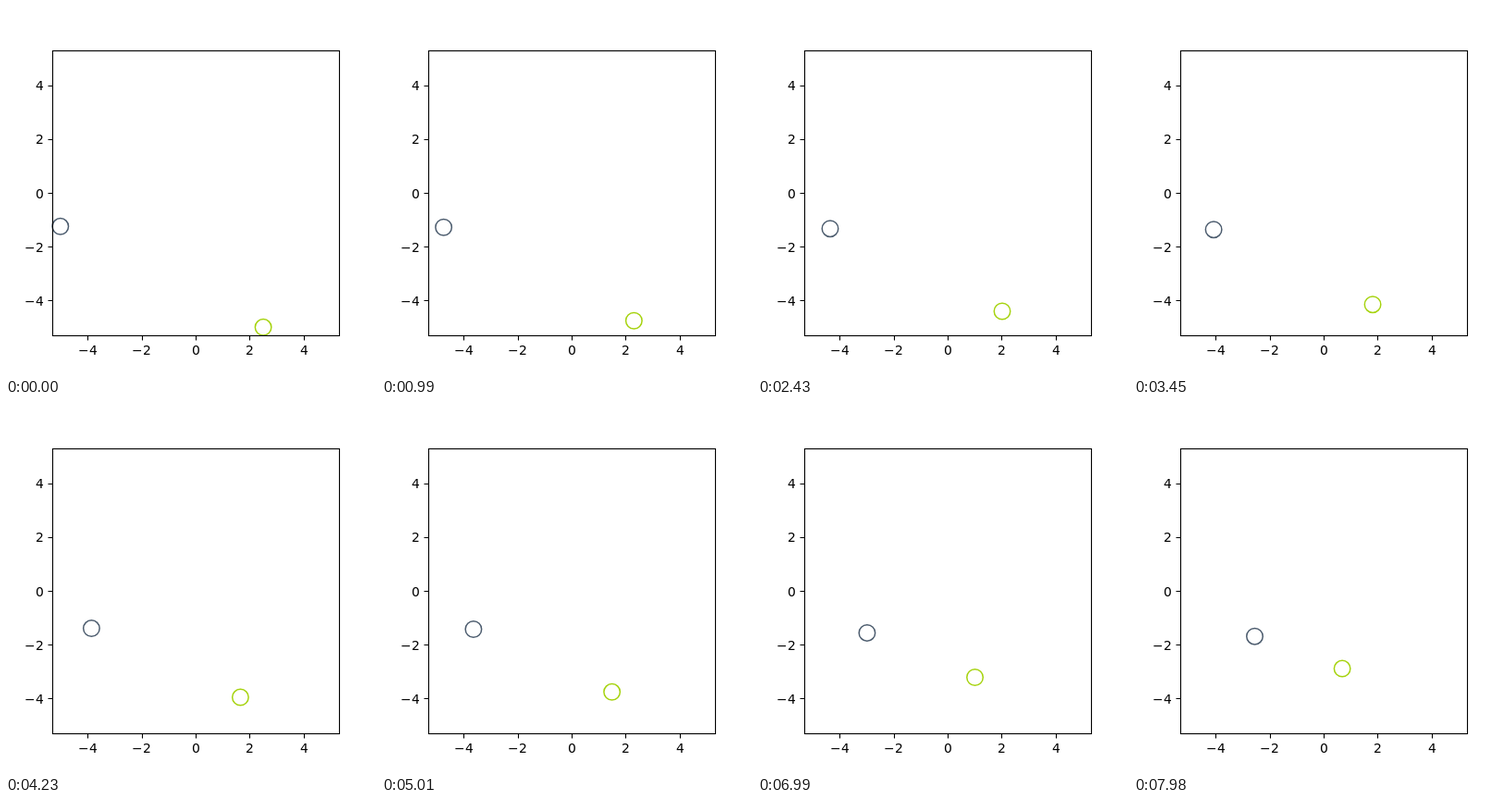
Animation, 400 px wide and 400 px high, one loop 8 s. Source, as an HTML page:

```html
<!DOCTYPE html>
<html lang="en">
<head>
<meta charset="utf-8">
<title>Two circles</title>
<style>
  html, body { margin: 0; width: 100%; height: 100%; overflow: hidden; background: #fff; }
  svg { display: block; width: 100vw; height: 100vh; }
  text { font: 13.89px "DejaVu Sans", sans-serif; fill: #000; }
  .axes { fill: none; stroke: #000; stroke-width: 1.11; }
  circle { fill: none; stroke-width: 1.5; }
</style>
</head>
<body>
<svg viewBox="0 0 400 400">
  <circle id="slate" r="8.75" stroke="#4c5c6e"/>
  <circle id="lime" r="8.75" stroke="#a6d30f"/>
  <rect class="axes" x="50.5" y="48.5" width="310" height="308"/>
  <g id="ticks"></g>
</svg>
<script>
const LOOP = 8000, STEP = 30;

// Pixels and pixels per second; the pull grows as the circles approach.
const bodies = {
  slate: { start: [58.8, 238.3], speed: [7.9, 0.98], pull: [1.1, 0.64] },
  lime: { start: [278.1, 347.3], speed: [-5.8, -7.13], pull: [-0.85, -0.55] }
};

// Glyphs sit on whole pixels, like the tick marks.
function label(value, width, left, baseline) {
  const x = Math.round(left);
  const minus = value < 0 ? `<text x="${x}" y="${baseline}">\u2212</text>` : '';
  const digitX = x + width - DIGIT;
  return `${minus}<text x="${Math.round(digitX)}" y="${baseline}">${Math.abs(value)}</text>`;
}

const DIGIT = 8.2, MINUS = 12;

function drawTicks() {
  const snap = v => Math.floor(v + 0.5) + 0.5;
  let marks = '', labels = '';
  for (let value = -4; value <= 4; value += 2) {
    const x = 205 + value * 310 / 10.6;
    const y = 202 - value * 308 / 10.6;
    const width = DIGIT + (value < 0 ? MINUS : 0);
    marks += `M${snap(x)} 356.5v5M50.5 ${snap(y)}h-5`;
    labels += label(value, width, x - width / 2, 377) +
              label(value, width, 40.3 - width, Math.round(y + 5.5));
  }
  document.getElementById('ticks').innerHTML = `<path class="axes" d="${marks}"/>${labels}`;
}

function draw(now) {
  const time = Math.floor((now % LOOP) / STEP) * STEP;
  const seconds = time / 1000;
  const closeness = (time / LOOP) ** 5;
  for (const id in bodies) {
    const { start, speed, pull } = bodies[id];
    const [x, y] = start.map((v, axis) => v + (speed[axis] + pull[axis] * closeness) * seconds);
    const circle = document.getElementById(id);
    circle.setAttribute('cx', x);
    circle.setAttribute('cy', y);
  }
}

let origin;
function tick(now) {
  origin ??= now;
  draw(now - origin);
  requestAnimationFrame(tick);
}

drawTicks();
draw(0);
requestAnimationFrame(tick);
</script>
</body>
</html>
```
